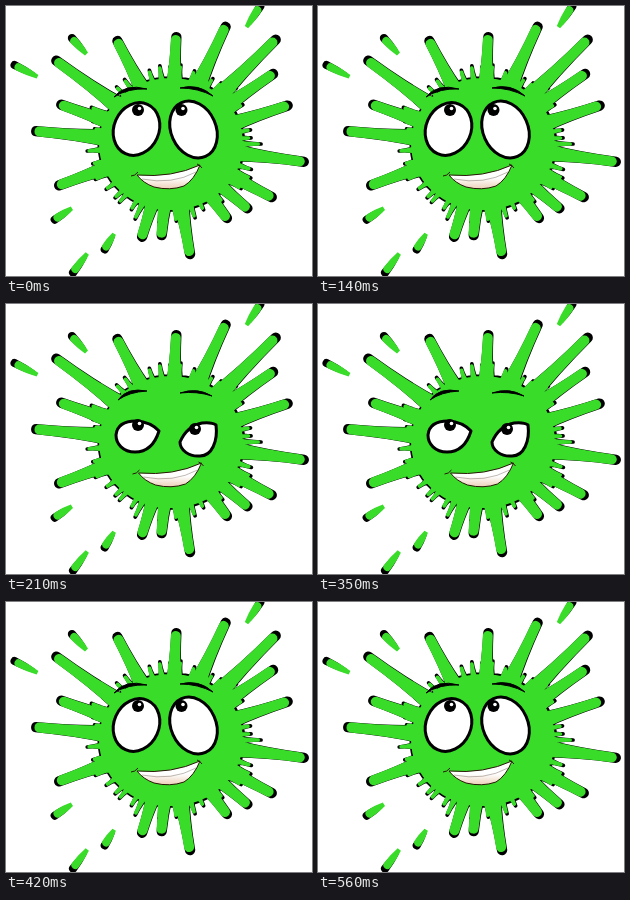
Recreate the animation shown at these times as an HTML page. Size 306 by 270 pixels, loop 630 ms.

```html
<!DOCTYPE html>
<html lang="en">
<head>
<meta charset="utf-8">
<title>Splat face</title>
<style>
html, body { margin: 0; width: 100%; height: 100%; overflow: hidden; background: #fff; }
svg { display: block; width: 100vw; height: 100vh; }
.eye { fill: #fff; stroke: #000; stroke-width: 3; stroke-linejoin: round; }
.lip { fill: none; stroke: #2a1608; }
</style>
</head>
<body>
<svg viewBox="0 0 306 270">
  <defs>
    <linearGradient id="teeth" x1="0" y1="0" x2="0" y2="1">
      <stop offset=".55" stop-color="#fff"/>
      <stop offset="1" stop-color="#ecd0b8"/>
    </linearGradient>
    <path id="splat"/>
    <g id="pupil">
      <circle r="6"/>
      <circle cx="1.5" cy="-1.5" r="1.8" fill="#fff"/>
    </g>
  </defs>
  <use href="#splat" transform="translate(150 138) scale(1.028) translate(-150 -138)"/>
  <use href="#splat" fill="#39dd29"/>

  <g id="mouth">
    <path d="M131 169Q166 172 194 159Q188 174 178 180Q164 185 148 181Q137 177 131 169Z" fill="url(#teeth)" stroke="#2a1608"/>
    <path class="lip" d="M136 173Q166 179 190 166" stroke-width=".6" opacity=".5"/>
    <path class="lip" d="M125 170Q129 170 132 166M191 158Q194 159 196 162"/>
  </g>

  <g id="wide">
    <path d="M108 91Q119 77 141 83Q122 82 108 91ZM174 82Q193 77 207 90Q192 82 174 82Z" stroke="#000"/>
    <ellipse class="eye" cx="130.500" cy="123" rx="22.500" ry="27" transform="rotate(24 130.500 123)"/>
    <ellipse class="eye" cx="187.500" cy="123.500" rx="22.500" ry="29.500" transform="rotate(-24 187.500 123.500)"/>
    <use href="#pupil" x="132" y="104"/>
    <use href="#pupil" x="175.500" y="104"/>
  </g>

  <g id="sly">
    <path d="M112 96Q121 83 141 87Q123 88 112 96ZM174 89Q191 83 206 92Q191 87 174 89Z" stroke="#000"/>
    <path class="eye" d="M110 131C111 121 119 117 130 117Q145 118 153 127C149 140 141 148 129 148C117 148 110 140 110 131Z"/>
    <path class="eye" d="M174 138Q181 122 196 119Q206 118 210 121C212 137 206 152 194 152C183 153 174 146 174 138Z"/>
    <use href="#pupil" x="132" y="121"/>
    <use href="#pupil" x="189" y="125"/>
  </g>
</svg>
<script>
const CX = 165, CY = 138, RX = 72, RY = 66, STEP = 70, LOOP = 630;
const $ = id => document.getElementById(id);

let seed = 7;
const rand = () => (seed = seed * 16807 % 2147483647) / 2147483647;
const rim = (a, k) => [CX + RX * k * Math.cos(a), CY + RY * k * Math.sin(a)];

// Round-tipped finger from (bx, by) to (x, y): root half-width w, tip radius r
function finger(bx, by, x, y, r, w) {
  const len = Math.hypot(x - bx, y - by);
  const ux = (x - bx) / len, uy = (y - by) / len;
  const at = (d, s) => `${(bx + ux * d - uy * s).toFixed(1)} ${(by + uy * d + ux * s).toFixed(1)}`;
  return `M${at(0, w)}Q${at(len * .4, r)} ${at(len - r, r)}` +
    `A${r} ${r} 0 0 0 ${at(len - r, -r)}Q${at(len * .4, -r)} ${at(0, -w)}Z`;
}

// Long arm growing out of the body towards its tip
function arm([x, y]) {
  const a = Math.atan2((y - CY) / RY, (x - CX) / RX);
  const reach = Math.hypot((x - CX) / RX, (y - CY) / RY);
  return finger(...rim(a, .9), x, y, 5, 5 + 4 * (reach - 1));
}

// Loose drop flying away from the centre
function drop([x, y]) {
  const dist = Math.hypot(x - CX, y - CY);
  const ux = (x - CX) / dist, uy = (y - CY) / dist, half = 2 + dist / 15;
  return finger(x - ux * half, y - uy * half, x + ux * half, y + uy * half, 4, 2);
}

const parse = s => s.split(' ').map(p => p.split(',').map(Number));
const arms = parse('49,54 110,33 170,29 220,19 270,33 268,67 283,99 299,156 ' +
  '267,192 243,204 222,214 184,250 155,232 135,233 51,180 28,125 53,98');
const drops = parse('73,40 20,65 247,11 57,208 74,257 103,236');

// Ragged rim of short spikes
const SPIKES = 46;
const spikes = Array.from({ length: SPIKES }, (_, i) => {
  const a = (i + rand() * .6) / SPIKES * 2 * Math.PI;
  return finger(...rim(a, .85), ...rim(a, 1.08 + .17 * rand()), 1.8, 6);
});

const core = `M${CX - RX} ${CY}a${RX} ${RY} 0 0 0 ${2 * RX} 0a${RX} ${RY} 0 0 0 ${-2 * RX} 0Z`;
$('splat').setAttribute('d', [core, ...spikes, ...arms.map(arm), ...drops.map(drop)].join(''));

function draw(ms) {
  const sly = Math.floor((ms % LOOP) / STEP) % 2 === 1;
  $('sly').style.display = sly ? '' : 'none';
  $('wide').style.display = sly ? 'none' : '';
  $('mouth').setAttribute('transform', `translate(${sly ? 1.5 : 0} 0)`);
}

const start = performance.now();
function tick() {
  draw(performance.now() - start);
  requestAnimationFrame(tick);
}
tick();
</script>
</body>
</html>
```
